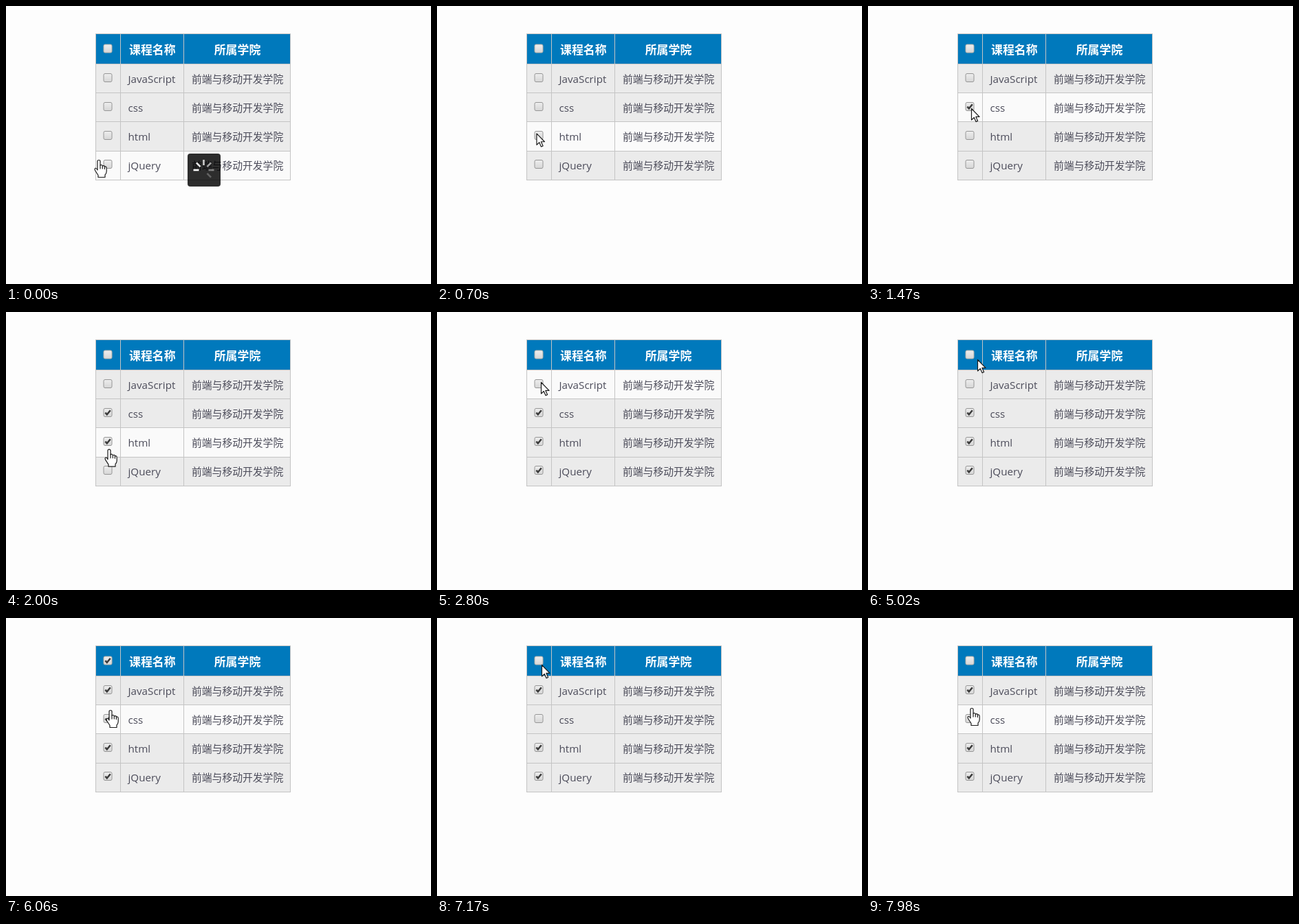
Recreate the animation shown at these times as an HTML page with a canvas. Size 618x405 px, loop 8 s.

```html
<!DOCTYPE html>
<html lang="zh">
<head>
<meta charset="utf-8">
<style>
  html, body { margin: 0; width: 100%; height: 100%; overflow: hidden; background: #fdfdfd; }
  canvas { display: block; }
</style>
</head>
<body>
<canvas id="stage" width="618" height="405"></canvas>
<script>
const ctx = document.getElementById('stage').getContext('2d');
const LOOP = 8000;
const CJK = '"Noto Sans CJK SC", "Noto Sans CJK", sans-serif';
const LATIN = '"Open Sans", "Noto Sans", sans-serif';
const COURSES = ['JavaScript', 'css', 'html', 'jQuery'];
const COLS = [130, 166, 258, 413];
const ROWS = [40, 84, 126, 168, 211, 253];
const BOX_X = 148;
const BOX_Y = [62, 104.5, 146.5, 188.5, 230.5];

const SPANS = [[140, 1090], [1240, 2260], [2410, 3340], [3490, 4470],
               [4600, 5630], [5750, 6750], [6900, 7830]];
const STEPS = [0, ...SPANS.flatMap(([a, b]) =>
  Array.from({ length: 8 }, (_, i) => a + (b - a) * i / 7)), 7980];
for (const t of [1470, 2800, 4040, 5020, 6060]) {
  const gap = s => Math.abs(s - t);
  const near = STEPS.reduce((a, b) => gap(b) < gap(a) ? b : a);
  STEPS[STEPS.indexOf(near)] = t;
}

// Pointer stops: time, x, y
const PATH = [
  [0, 135, 224], [140, 135, 224], [550, 143, 195], [1000, 150, 149], [1470, 150, 149],
  [1740, 150, 190], [1900, 150, 190], [2120, 150, 232], [2330, 150, 232],
  [2680, 151, 102], [3150, 151, 102], [3500, 150, 67], [4040, 150, 67],
  [4260, 150, 105], [4560, 150, 105], [4890, 159, 69], [5020, 159, 69],
  [5260, 150, 105], [5600, 150, 105], [5900, 152, 134], [6060, 152, 134],
  [6280, 150, 147], [6600, 150, 147], [6980, 152, 68], [7400, 152, 68],
  [7800, 151, 131], [8000, 151, 131]
];

// Clicks on course boxes: time, row
const CLICKS = [[1240, 1], [1820, 2], [2240, 3], [2980, 0],
                [4400, 0], [5440, 0], [6380, 1]];

const ease = u => u * u * (3 - 2 * u);

function pointerAt(t) {
  let i = 0;
  while (i < PATH.length - 2 && PATH[i + 1][0] <= t) i++;
  const [t0, x0, y0] = PATH[i], [t1, x1, y1] = PATH[i + 1];
  const u = ease((t - t0) / (t1 - t0));
  return [x0 + (x1 - x0) * u, y0 + (y1 - y0) * u];
}

function rect(x, y, w, h, fill) {
  ctx.fillStyle = fill;
  ctx.fillRect(x, y, w, h);
}

function text(str, x, y, font, fill, align = 'left') {
  ctx.font = font;
  ctx.fillStyle = fill;
  ctx.textAlign = align;
  ctx.fillText(str, x, y);
}

function checkbox(y, on, head) {
  const g = ctx.createLinearGradient(0, y - 6, 0, y + 6);
  g.addColorStop(0, '#eeeeee');
  g.addColorStop(1, '#d6d6d6');
  ctx.beginPath();
  ctx.roundRect(BOX_X - 6, y - 6, 12, 12, 2);
  ctx.fillStyle = g;
  ctx.fill();
  ctx.lineWidth = 1;
  ctx.strokeStyle = head ? '#b3b0a8' : '#969696';
  ctx.stroke();
  if (!on) return;
  ctx.beginPath();
  ctx.moveTo(BOX_X - 3.6, y + 0.2);
  ctx.lineTo(BOX_X - 1.2, y + 2.8);
  ctx.lineTo(BOX_X + 3.8, y - 3.2);
  ctx.lineWidth = 2.5;
  ctx.strokeStyle = '#3b3b3b';
  ctx.stroke();
}

function table(checked, hover) {
  const [left, , , right] = COLS;
  rect(left, 40, right - left, 44, '#0079bc');
  COURSES.forEach((_, i) => {
    const y = ROWS[i + 1];
    rect(left, y, right - left, ROWS[i + 2] - y, i === hover ? '#fafafa' : '#ebebeb');
  });
  for (const y of ROWS) rect(left, y, right - left + 1, 1, '#c4c4c4');
  for (const x of COLS) rect(x, 40, 1, 214, '#c4c4c4');

  const headFont = 'bold 16.9px ' + CJK;
  text('课程名称', 212.8, 69.5, headFont, '#fff', 'center');
  text('所属学院', 336.5, 69.5, headFont, '#fff', 'center');
  checkbox(BOX_Y[0], checked.every(Boolean), true);
  COURSES.forEach((name, i) => {
    const y = 112 + 42 * i;
    text(name, 177.5, y, '15.2px ' + LATIN, '#4c4c5a');
    text('前端与移动开发学院', 270, y, '14.8px ' + CJK, '#4c4c5a');
    checkbox(BOX_Y[i + 1], checked[i], false);
  });
}

function spinner() {
  ctx.beginPath();
  ctx.roundRect(264, 215, 48, 48, 4);
  ctx.fillStyle = 'rgba(0,0,0,.82)';
  ctx.fill();
  ctx.lineWidth = 2.6;
  [1, 0.9, 0.78, 0.6, 0.42, 0.26].forEach((alpha, i) => {
    const a = Math.PI * (1 + i / 4), c = Math.cos(a), s = Math.sin(a);
    ctx.strokeStyle = `rgba(255,255,255,${alpha})`;
    ctx.beginPath();
    ctx.moveTo(287.5 + 7 * c, 239 + 7 * s);
    ctx.lineTo(287.5 + 15 * c, 239 + 15 * s);
    ctx.stroke();
  });
}

function cursor(x, y, d, lines) {
  ctx.save();
  ctx.translate(x, y);
  ctx.lineJoin = ctx.lineCap = 'round';
  ctx.lineWidth = 1.2;
  ctx.strokeStyle = '#1c1c1c';
  ctx.fillStyle = '#fff';
  const shape = new Path2D(d);
  ctx.fill(shape);
  ctx.stroke(shape);
  if (lines) ctx.stroke(new Path2D(lines));
  ctx.restore();
}

const ARROW = 'M0.5 0.5V17L4.3 13.4L7 19.6L9.6 18.5L6.9 12.4H12Z';
const HAND = 'M-2 15V2.5Q-2 0.5 0 0.5T2 2.5V8Q4.6 6.6 5.3 9Q7.8 7.8 8.4 10' +
  'Q11.2 9.4 11.2 12.4V17Q11 20 9 22V25.5H-1V22.5L-5.2 16Q-6.7 13 -5 12.3Q-3.6 12 -2 15Z';
const KNUCKLES = 'M2 8V13M5.3 9V13M8.4 10V13.5';

function draw(time) {
  const t = STEPS.filter(s => s <= time).pop();
  const [x, y] = pointerAt(t);
  const checked = COURSES.map((_, i) =>
    CLICKS.filter(([at, row]) => row === i && at <= t).length % 2 === 1);
  const inside = x > 130 && x < 413;
  const hover = inside ? COURSES.findIndex((_, i) => y >= ROWS[i + 1] && y < ROWS[i + 2]) : -1;
  const onBox = BOX_Y.some(b => Math.abs(x - BOX_X) < 7 && Math.abs(y - b) < 7);

  rect(0, 0, 618, 405, '#fdfdfd');
  table(checked, hover);
  if (t < 140) spinner();
  if (hover >= 0 && !onBox) cursor(x, y, HAND, KNUCKLES);
  else cursor(x, y, ARROW);
}

const start = performance.now();
function tick() {
  draw((performance.now() - start) % LOOP);
  requestAnimationFrame(tick);
}
tick();
</script>
</body>
</html>
```
